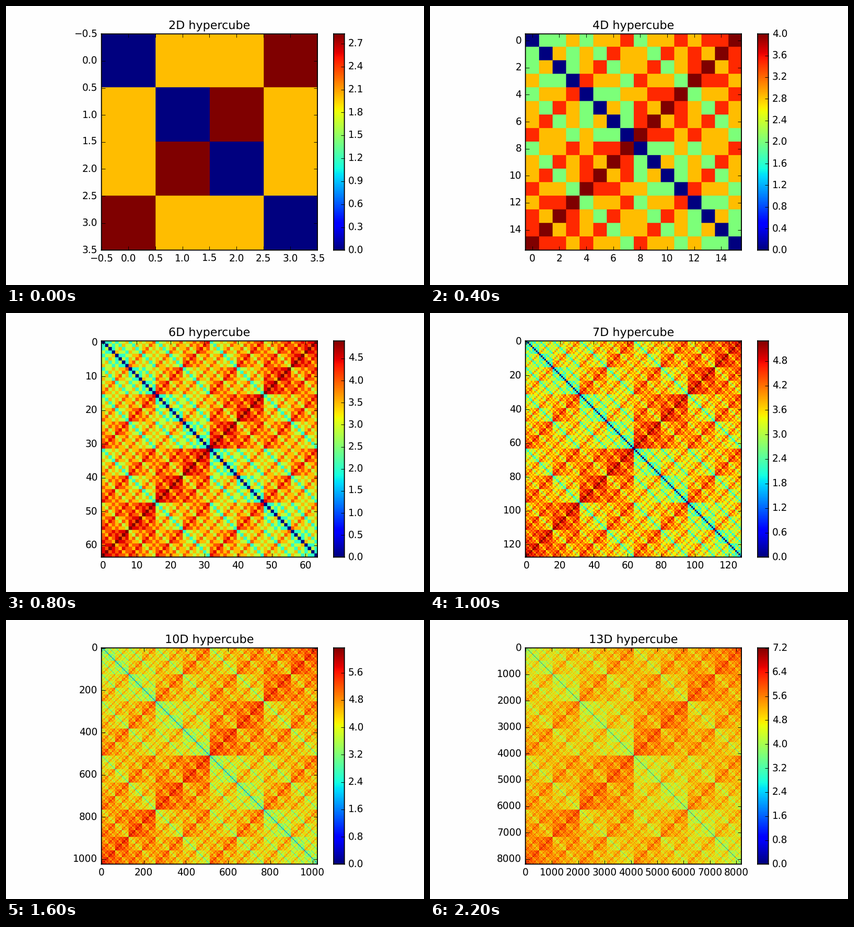
Animation, 800 px wide and 533 px high, one loop 2.4 s. Source, as a matplotlib script:

```python
import numpy as np
import matplotlib.pyplot as plt
from matplotlib.animation import FuncAnimation

W, H = 800, 533
PT = 4 / 3          # classic 6 x 4 inch point sizes, scaled to 100 dpi
SAMPLES = 930       # matrix is sampled finer than the screen, then reduced
FIRST, COUNT = 2, 12
AXIS_STEPS = (1, 2, 5, 10)
BAR_STEPS = (1, 1.5, 2, 2.5, 3, 4, 5, 6, 8, 10)

plt.rcParams.update({
    "font.family": "DejaVu Sans",
    "font.size": 10 * PT,
    "text.hinting": "none",
    "path.snap": False,
    "axes.titlesize": 12 * PT,
    "axes.titlepad": 5 * PT,
    "axes.linewidth": PT,
    "axes.axisbelow": False,
    "ytick.alignment": "center",
})

BACK = "#fefefe"
jet = plt.get_cmap("jet")
fig = plt.figure(figsize=(W / 100, H / 100), dpi=100, facecolor=BACK)

# Square plot against the right of its slot, colour bar beside it
bottom, height = 0.125, 0.775
side = height * W * 2 / 3
ax = fig.add_axes([(596 - side) / W, bottom, side / W, height])
bar = fig.add_axes([627 / W, bottom, side / 20 / W, height])

image = ax.imshow(np.zeros((SAMPLES, SAMPLES, 3), np.uint8),
                  aspect="auto", interpolation="catrom")
ramp = bar.imshow(np.arange(256)[:, None], cmap=jet, origin="lower",
                  aspect="auto", interpolation="nearest")

tick_style = dict(direction="in", length=4 * PT, width=0.5 * PT, pad=4 * PT)
ax.tick_params(top=True, right=True, **tick_style)
bar.tick_params(axis="y", left=False, right=True, labelleft=False,
                labelright=True, **tick_style)
bar.set_xticks([])


def nice_ticks(lo, hi, bins, steps):
    raw = (hi - lo) / bins
    scale = 10 ** np.floor(np.log10(raw))
    step = next(s * scale for s in steps if s * scale >= raw - 1e-9)
    first = np.ceil(lo / step - 1e-9)
    last = np.floor(hi / step + 1e-9)
    return np.arange(first, last + 1) * step + 0.0


def set_ticks(axis, ticks, decimals):
    labels = [f"{t:.{decimals}f}".replace("-", "\u2212") for t in ticks]
    axis.set_ticks(ticks, labels=labels)


def distance_image(dim):
    """Distances 2*sqrt(differing bits) between all corners, as colours."""
    size = 2 ** dim
    index = (np.arange(SAMPLES) + 0.5) * size / SAMPLES
    index = index.astype(int)
    bits = sum((np.arange(size) >> b) & 1 for b in range(dim))
    palette = jet(np.sqrt(np.arange(dim + 1) / dim), bytes=True)[:, :3]
    return palette[bits[index[:, None] ^ index]]


def update(i):
    dim = FIRST + i
    lo, hi = -0.5, 2 ** dim - 0.5
    top = 2 * np.sqrt(dim)

    image.set_data(distance_image(dim))
    image.set_extent((lo, hi, hi, lo))
    ticks = nice_ticks(lo, hi, 9, AXIS_STEPS)
    for axis in (ax.xaxis, ax.yaxis):
        set_ticks(axis, ticks, 1 if dim == 2 else 0)
    ax.set_xlim(lo, hi)
    ax.set_ylim(hi, lo)
    ax.set_title(f"{dim}D hypercube")

    ramp.set_extent((0, 1, 0, top))
    set_ticks(bar.yaxis, nice_ticks(0, top, 10, BAR_STEPS), 1)
    bar.set_xlim(0, 1)
    bar.set_ylim(0, top)
    return []


anim = FuncAnimation(fig, update, frames=COUNT, interval=200,
                     init_func=lambda: update(0), repeat=True,
                     repeat_delay=0, blit=False)
plt.show()
```
